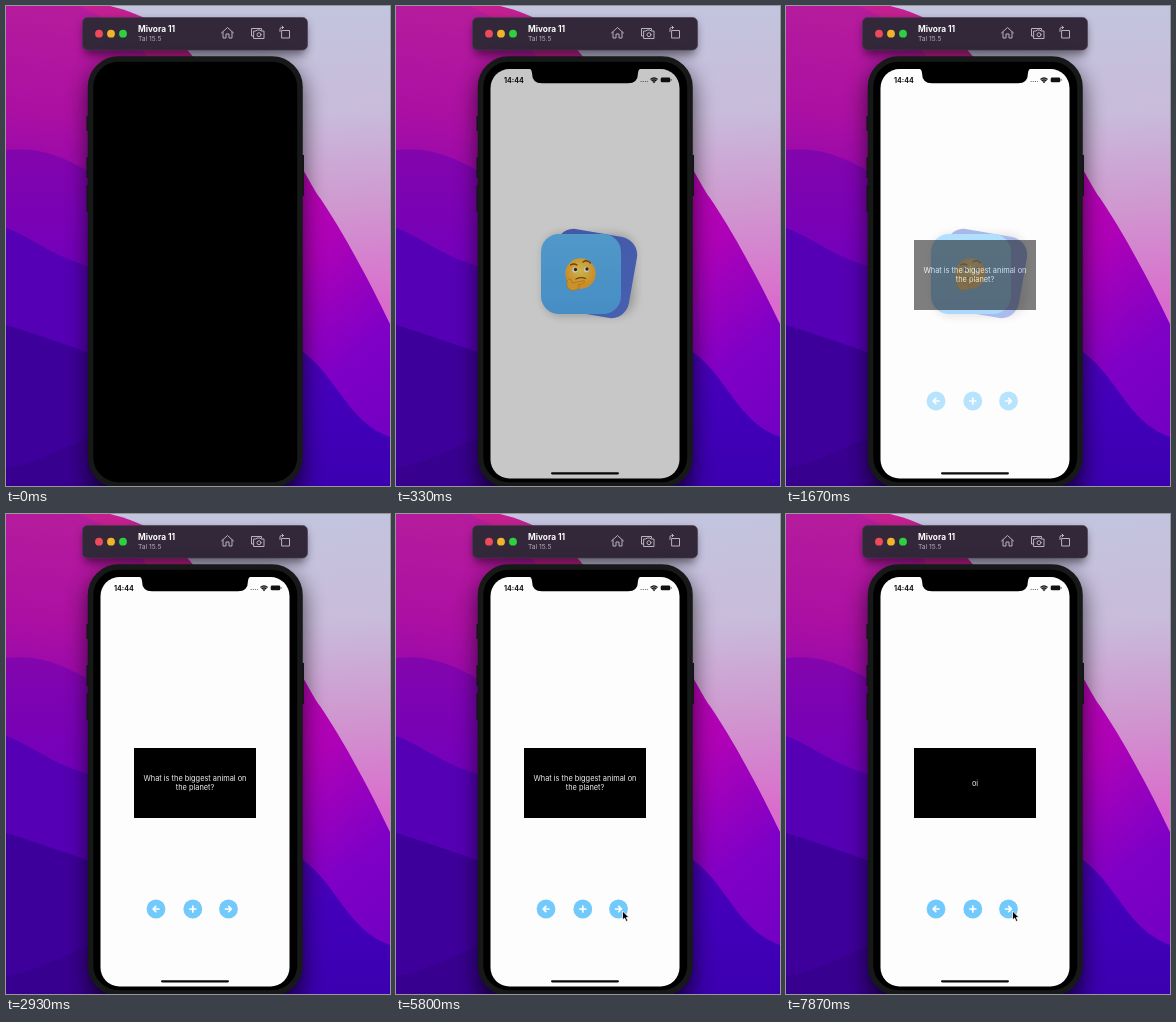
These frames come from a looping animation (384x480 px, 8 s). An HTML page:

```html
<!DOCTYPE html>
<html lang="en">
<head>
<meta charset="utf-8">
<title>Quiz app demo</title>
<style>
  html, body { margin: 0; height: 100%; overflow: hidden; background: #000; }
  svg { display: block; width: 100vw; height: 100vh; }
  text { font-family: Inter, Roboto, sans-serif; }
  .line { fill: none; stroke: #b9b1bc; stroke-width: 1; stroke-linejoin: round; stroke-linecap: round; }
  .card text { font-size: 7.4px; fill: #eee; text-anchor: middle; }
  .glyph { fill: none; stroke: #fff; stroke-width: 1.7; stroke-linecap: round; stroke-linejoin: round; }
</style>
</head>
<body>
<svg viewBox="0 0 384 480" preserveAspectRatio="none">
  <defs>
    <linearGradient id="sky" gradientUnits="userSpaceOnUse" x1="330" y1="0" x2="350" y2="300">
      <stop stop-color="#c3c4de"/><stop offset=".35" stop-color="#c8bcdb"/><stop offset=".65" stop-color="#cf9ad0"/><stop offset="1" stop-color="#da6ccc"/>
    </linearGradient>
    <linearGradient id="dune" x1="0" y1="0" x2=".25" y2="1">
      <stop stop-color="#c206b0"/><stop offset=".4" stop-color="#ae02b6"/><stop offset=".75" stop-color="#8000c6"/><stop offset="1" stop-color="#7400c4"/>
    </linearGradient>
    <linearGradient id="deep" x1="0" y1="0" x2="0" y2="1">
      <stop stop-color="#4c02b8"/><stop offset=".5" stop-color="#4200b9"/><stop offset="1" stop-color="#3c00b0"/>
    </linearGradient>
    <linearGradient id="magenta" gradientUnits="userSpaceOnUse" x1="40" y1="0" x2="20" y2="170">
      <stop stop-color="#b51c9c"/><stop offset=".6" stop-color="#ac10a2"/><stop offset="1" stop-color="#9808ac"/>
    </linearGradient>
    <linearGradient id="violet" gradientUnits="userSpaceOnUse" x1="0" y1="140" x2="0" y2="265">
      <stop stop-color="#8405ac"/><stop offset="1" stop-color="#7200bc"/>
    </linearGradient>
    <linearGradient id="front" x1="0" y1="0" x2="0" y2="1">
      <stop stop-color="#66c2ff"/><stop offset="1" stop-color="#5ab4fa"/>
    </linearGradient>
    <linearGradient id="back" x1="0" y1="0" x2="1" y2="1">
      <stop stop-color="#5470d4"/><stop offset="1" stop-color="#5a7ade"/>
    </linearGradient>
    <radialGradient id="face" cy=".4">
      <stop stop-color="#ffe863"/><stop offset="1" stop-color="#ffb336"/>
    </radialGradient>
    <filter id="blur" x="-30%" y="-30%" width="160%" height="160%"><feGaussianBlur stdDeviation="5"/></filter>
    <filter id="wideBlur" x="-30%" y="-30%" width="160%" height="160%"><feGaussianBlur stdDeviation="11"/></filter>
    <clipPath id="screen"><rect x="94.500" y="63" width="189" height="409.500" rx="19"/></clipPath>
  </defs>

  <!-- wallpaper -->
  <rect width="384" height="480" fill="url(#sky)"/>
  <path d="M0 0H104C140 8 170 28 188 52L250 480H0Z" fill="#c41f90"/>
  <path d="M0 0H74C100 12 125 28 142 52V480H0Z" fill="url(#magenta)"/>
  <path d="M0 144C35 140 60 150 110 182V480H0Z" fill="url(#violet)"/>
  <path d="M0 222C28 231 55 260 110 265V480H0Z" fill="#5500b4"/>
  <path d="M0 319C30 328 58 338 110 356V480H0Z" fill="#3e009b"/>
  <path d="M0 462C30 458 60 440 110 420V480H0Z" fill="#38008f"/>
  <path d="M270 120C298 162 305 180 314 192C336 224 364 276 384 318V480H270Z" fill="url(#dune)"/>
  <path d="M270 332C330 352 332 412 384 431V480H270Z" fill="url(#deep)"/>

  <!-- simulator toolbar -->
  <rect x="78" y="16" width="222" height="33" rx="6" opacity=".5" filter="url(#blur)"/>
  <rect x="76.500" y="11.500" width="225" height="32.500" rx="5" fill="#33283a" stroke="#493d50" stroke-width=".6"/>
  <circle cx="93" cy="27.700" r="3.900" fill="#ee4a5b"/>
  <circle cx="105" cy="27.700" r="3.900" fill="#f0b32c"/>
  <circle cx="117" cy="27.700" r="3.900" fill="#2fd03f"/>
  <text x="132" y="26.200" font-size="8.300" font-weight="700" fill="#fff">Mivora 11</text>
  <text x="132" y="35.200" font-size="6.700" fill="#b7abba">Tal 15.5</text>
  <g class="line">
    <path d="M215.500 27L221.500 21.500L227.500 27M217 26V32H220V28H223V32H226V26"/>
    <path d="M247.500 30H245.500V22.500H255.500V24M248 25H250L251 24H254L255 25H258V32.500H248Z"/>
    <circle cx="253" cy="28.700" r="2"/>
    <path d="M276 24.500H283.500V32H276ZM274 25.500V23Q274 21.500 275.500 21.500H277.500M276 20L277.500 21.500L276 23"/>
  </g>

  <!-- phone -->
  <rect x="82" y="58" width="215" height="440" rx="32" opacity=".65" filter="url(#wideBlur)"/>
  <path d="M81.500 110V125M81.500 151V172M81.500 179V206M297 149V190" stroke="#15131a" stroke-width="2"/>
  <rect x="84.500" y="53" width="209.500" height="426" rx="28" fill="#000" stroke="#171919" stroke-width="5.500"/>

  <g clip-path="url(#screen)">
    <g id="app">
      <rect x="94" y="62" width="190" height="411" fill="#fdfdfd"/>
      <g id="splash">
        <rect x="147" y="228" width="92" height="82" rx="18" opacity=".22" filter="url(#blur)"/>
        <rect x="155.500" y="226.500" width="82" height="82" rx="18" fill="url(#back)" transform="rotate(10 196.500 267.500)"/>
        <rect x="145" y="228" width="80" height="80" rx="18" fill="url(#front)"/>
        <circle cx="184.500" cy="267.500" r="15.200" fill="url(#face)"/>
        <path d="M174.500 259Q178 257 181 259M187 256Q191 253 194.500 257M180 273Q185 270.500 189.500 272.500" fill="none" stroke="#8a5010" stroke-width="1.300" stroke-linecap="round"/>
        <ellipse cx="179" cy="264" rx="2.600" ry="2.800" fill="#fff"/>
        <ellipse cx="190.500" cy="263.500" rx="2.600" ry="2.800" fill="#fff"/>
        <circle cx="179.500" cy="263.500" r="1.700" fill="#4a2a10"/>
        <circle cx="191" cy="263" r="1.700" fill="#4a2a10"/>
        <path d="M172 282C169 277 172 272 174.500 273L176.500 277L188 274.500Q190 276 187 277.500L182 279Q185 282 181 283.500Q175 286 172 282Z" fill="#ffb838" stroke="#dd8a1a" stroke-width=".7"/>
      </g>
      <g id="quiz">
        <g class="card">
          <rect x="128" y="234" width="122" height="70"/>
          <g id="question">
            <text x="189" y="267.300">What is the biggest animal on</text>
            <text x="189" y="276.300">the planet?</text>
          </g>
          <text id="answer" x="189" y="271.700">oi</text>
        </g>
        <g fill="#72c9fb">
          <circle cx="150" cy="395" r="9.400"/>
          <circle cx="186.800" cy="395" r="9.400"/>
          <circle cx="222.500" cy="395" r="9.400"/>
        </g>
        <g class="glyph">
          <path d="M153 395H147.500M149.800 392.300L147.100 395L149.800 397.700"/>
          <path d="M183.800 395H189.800M186.800 392V398"/>
          <path d="M219.500 395H225M222.700 392.300L225.400 395L222.700 397.700"/>
        </g>
        <circle id="press" cx="222.500" cy="395" r="9.400" fill="#46587a"/>
      </g>
      <!-- status bar -->
      <text x="108" y="76.800" font-size="7.100" font-weight="700" fill="#111">14:44</text>
      <path d="M244.500 75.500H252" stroke="#777" stroke-width="1.200" stroke-dasharray="1.200 1"/>
      <path d="M254 73Q258 69.500 262 73L258 77.300Z" fill="#111"/>
      <path d="M254.800 74Q258 71.500 261.200 74M256.200 75.600Q258 74.200 259.800 75.600" fill="none" stroke="#fdfdfd" stroke-width=".5"/>
      <rect x="264.700" y="71.500" width="9.600" height="4.800" rx="1.400" fill="#111"/>
      <rect x="274.800" y="73" width=".8" height="1.800" fill="#555"/>
      <rect x="155" y="466.200" width="68" height="2.300" rx="1.150" fill="#0a0a0a"/>
    </g>
    <path d="M132 62Q136 63 136 67Q136 77.300 146 77.300H232Q242 77.300 242 67Q242 63 246 62Z"/>
  </g>

  <path id="cursor" d="M0 0V9L2.100 7.100L3.700 10.500L5.300 9.700L3.800 6.500H6.500Z" stroke="#fff" stroke-width=".8"/>
</svg>

<script>
const LOOP = 8000;
const el = id => document.getElementById(id);
const [app, splash, quiz, question, answer, press, cursor] =
  ['app', 'splash', 'quiz', 'question', 'answer', 'press', 'cursor'].map(el);

const ease = (t, from, to) => {
  const p = Math.min(1, Math.max(0, (t - from) / (to - from)));
  return p * p * (3 - 2 * p);
};
const mix = (a, b, p) => a + (b - a) * p;
const fade = (node, value) => node.setAttribute('opacity', value);

function draw(t) {
  fade(app, ease(t, 0, 470));

  const swap = ease(t, 1470, 1870);
  fade(quiz, swap);
  fade(splash, 1 - swap);

  // the pointer enters, rests, then moves onto the next button
  const enter = ease(t, 3870, 4330), approach = ease(t, 4800, 5330);
  const x = mix(mix(390, 318, enter), 226.5, approach);
  const y = mix(mix(440, 405.5, enter), 397, approach);
  cursor.setAttribute('transform', `translate(${x} ${y})`);

  const reveal = ease(t, 7130, 7480);
  fade(press, t < 7000 ? 0 : 0.92 * (1 - reveal));
  fade(question, 1 - reveal);
  fade(answer, reveal);
}

function tick() {
  draw(performance.now() % LOOP);
  requestAnimationFrame(tick);
}
tick();
</script>
</body>
</html>
```
